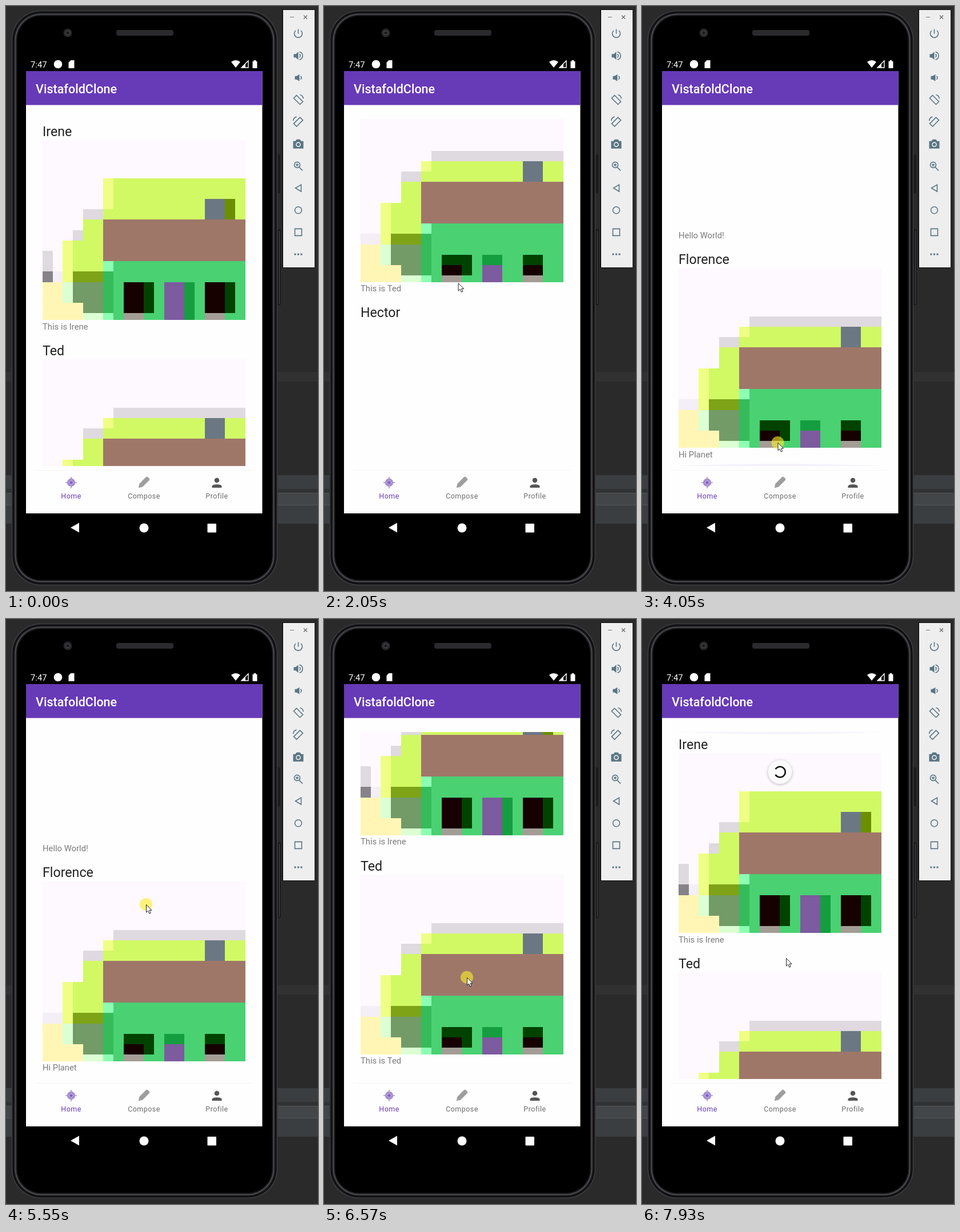
Recreate the animation shown at these times as an HTML page with a canvas. Size 546x1025 px, loop 8 s.

```html
<!DOCTYPE html>
<html lang="en">
<head>
<meta charset="utf-8">
<style>
  html, body { margin: 0; width: 100%; height: 100%; overflow: hidden; background: #2a2a2a; }
  canvas { display: block; }
</style>
</head>
<body>
<canvas id="stage" width="546" height="1025"></canvas>
<script>
const g = document.getElementById('stage').getContext('2d');
const LOOP = 8000, PITCH = 383.7, MAX_SCROLL = 927;

// ---------- drawing helpers ----------
function rect(color, x, y, w, h) {
  g.fillStyle = color;
  g.fillRect(x, y, w, h);
}
function round(color, x, y, w, h, r) {
  g.fillStyle = color;
  g.beginPath();
  g.roundRect(x, y, w, h, r);
  g.fill();
}
function disc(color, x, y, r) {
  g.fillStyle = color;
  g.beginPath();
  g.arc(x, y, r, 0, 7);
  g.fill();
}
function label(str, x, y, size, color, weight = 400) {
  g.font = `${weight} ${size}px Roboto, sans-serif`;
  g.fillStyle = color;
  g.fillText(str, x, y);
}
function shape(d, x, y, fill, stroke, width = 1.6, angle = 0) {
  const path = new Path2D(d);
  g.save();
  g.translate(x, y);
  g.rotate(angle);
  if (fill) { g.fillStyle = fill; g.fill(path); }
  if (stroke) { g.strokeStyle = stroke; g.lineWidth = width; g.stroke(path); }
  g.restore();
}
function clipped(x, y, w, h, draw) {
  g.save();
  g.beginPath();
  g.rect(x, y, w, h);
  g.clip();
  draw();
  g.restore();
}

// ---------- motion ----------
const progress = (t, a, b) => b > a ? Math.min(1, Math.max(0, (t - a) / (b - a))) : +(t >= a);
const smooth = u => u * u * (3 - 2 * u);
const easeOut = u => 1 - (1 - u) ** 3;
const mix = (a, b, u) => a + (b - a) * u;
const bump = (t, a, b) => Math.sin(Math.PI * progress(t, a, b));

// The pointer glides between swipes; a swipe drags the list, which then coasts to `rest`
const swipes = [
  { press: 70, release: 70, x: 468, from: 956, to: 956 },
  { press: 560, release: 560, x: 231, from: 447, to: 447 },
  { press: 930, release: 1600, x: 237, from: 680, to: 459, rest: 543.5, settle: 1330 },
  { press: 3090, release: 3450, x: 226, from: 578, to: 398, rest: MAX_SCROLL, settle: 440 },
  { press: 3970, release: 4560, x: 237.5, from: 770, to: 500 },
  { press: 5550, release: 5900, x: 245, from: 500, to: 760, rest: 364, settle: 500 },
  { press: 6410, release: 6580, x: 250, from: 435, to: 650, rest: 0, settle: 260 },
  { press: 7290, release: 7800, x: 237, from: 307, to: 594 },
  { press: 7930, release: 7930, x: 252, from: 594, to: 594 }
];
const dragged = (s, t) => progress(t, s.press, s.release) ** 2;

function scrollAt(t) {
  let scroll = 0;
  for (const s of swipes) {
    if (t < s.press) break;
    const drag = scroll + (s.from - s.to) * dragged(s, t);
    scroll = Math.min(MAX_SCROLL, Math.max(0, drag));
    if (s.settle) scroll = mix(scroll, s.rest, easeOut(progress(t, s.release, s.release + s.settle)));
  }
  return scroll;
}

function pointerAt(t) {
  const i = swipes.findLastIndex(s => t >= s.press);
  const s = swipes[i], next = swipes[i + 1] || s;
  if (t < s.release) return { x: s.x, y: mix(s.from, s.to, dragged(s, t)), down: true };
  const u = smooth(progress(t, s.release, next.press));
  return { x: mix(s.x, next.x, u), y: mix(s.to, next.from, u), down: false };
}

// ---------- feed ----------
const posts = [
  { name: 'Irene', caption: 'This is Irene', picture: 'tall' },
  { name: 'Ted', caption: 'This is Ted', picture: 'low' },
  { name: 'Hector', caption: 'Hello World!' },
  { name: 'Florence', caption: 'Hi Planet', picture: 'low' }
];

// A blocky house on a grid of 20 columns, cropped at the top and bottom
function house(top, tall) {
  const px = col => Math.round(64 + col * 17.73), py = row => Math.round(top - 6.3 + row * 18.2);
  const block = (color, x0, y0, x1, y1) =>
    rect(color, px(x0), py(y0), px(x1) - px(x0), py(y1) - py(y0));
  const lime = '#d1f964', pale = '#efff84', gray = '#dfd9e0', sand = '#fff6b5';
  const roof = tall ? 4 : 6;

  block('#fef8ff', 0, 0, 20, 18);
  block(gray, 4, 7, 6, 8);
  if (tall) {
    block(gray, 3, 9, 4, 10);
    block(gray, 0, 11, 1, 13);
  } else {
    block(gray, 7, 5, 20, 6);
  }
  for (let i = 0; i < 3; i++) block(lime, 6 - 2 * i, 6 + 2 * i, 7, 14);
  block(lime, 6, roof, 20, 8);
  block(pale, 6, roof, 7, 7);
  block(pale, 2, 10, 3, 14);

  block('#f4eef6', 0, 13, 2, 14);
  if (tall) block('#868388', 0, 13, 1, 14);
  block('#7ea317', 3, 13, 6, 14);
  block('#dcffd3', 2, 14, 6, 18);
  block('#739b67', 3, 14, 6, 17);
  block(sand, 0, 14, 2, 18);
  block(sand, 0, 16, 4, 18);

  block('#9f7769', 6, 8, 20, 12);
  block('#49d172', 7, 12, 20, 18);
  block('#8dffb3', 6, 12, 7, 18);
  block('#36bb5a', 6, 13, 7, 17);
  block('#6b7883', 16, 6, 18, 8);
  if (tall) block('#6b8f00', 18, 6, 19, 8);

  for (const x of [8, 12, 16]) {
    const door = x === 12, end = door ? 18 : 17;
    const shade = door ? '#149e3f' : '#004200';
    if (tall) block(shade, x + 2, 14, x + 3, end);
    else block(shade, x, 15, x === 8 ? 11 : x + 2, end);
    block(door ? '#7c5b9e' : '#160000', x, tall ? 14 : 16, x + 2, end);
    if (!door) block('#a49d96', x, 17, x + 2, 18);
  }
}

function glow(y, height) {
  g.fillStyle = `rgba(103, 58, 183, ${.04 + Math.abs(height) / 300})`;
  g.beginPath();
  g.moveTo(59, y);
  g.quadraticCurveTo(241, y + height, 424, y);
  g.fill();
}

function feed(t) {
  const scroll = scrollAt(t);
  clipped(52, 198, 380, 608, () => {
    posts.forEach(({ name, caption, picture }, i) => {
      const y = i * PITCH - scroll, top = Math.round(y + 235.4);
      label(name, 64, y + 228, 23.2, '#222');
      if (picture) clipped(64, top, 355, 315, () => house(top, picture === 'tall'));
      label(caption, 64, y + 566.5, 14.8, '#7b7b7b');
    });
    glow(806, -50 * bump(t, 4000, 5080));
    glow(198, 40 * bump(t, 6640, 6960) + 7 * progress(t, 7290, 7930));
  });
}

function spinner(t) {
  const pull = progress(t, 7290, 7800) ** 2;
  const y = 153 + 21 * bump(t, 6700, 7240) + 131 * pull - 16 * smooth(progress(t, 7800, 7930));
  if (y < 166) return;
  clipped(36, 189, 412, 620, () => {
    g.shadowColor = 'rgba(0,0,0,.28)';
    g.shadowBlur = 5;
    g.shadowOffsetY = 1;
    disc('#fafafa', 241.5, y, 21);
    g.shadowColor = 'transparent';
    const turn = (t - 7930) / 400;
    g.strokeStyle = `rgba(15,15,15,${.3 + .7 * pull})`;
    g.lineWidth = 2.6;
    g.beginPath();
    g.arc(241.5, y, 9.3, turn - 2.6 * pull, turn + 2.6 * pull);
    g.stroke();
  });
}

function pointer(t) {
  if (t < swipes[0].press) return;
  const { x, y, down } = pointerAt(t);
  if (down) disc('rgba(250,238,40,.62)', x, y, 11);
  shape('M.5 .5V14L3.6 11.2L5.8 16.2L8.2 15.1L6 10.3H10Z', x, y, '#fff', '#222', 1);
}

// ---------- fixed surroundings ----------
function desktop() {
  rect('#2a2a2a', 0, 0, 546, 1025);
  rect('#313131', 0, 641, 546, 17);
  rect('#3b3e40', 0, 822, 546, 85);
  rect('#303234', 0, 846, 546, 8);
  rect('#54575a', 0, 853, 546, 22);
  rect('#434649', 0, 854, 546, 20);
}

function phone() {
  round('#1b1b1c', 474, 260, 6, 68, 2);
  round('#1b1b1c', 474, 391, 7, 133, 2);
  rect('#48494c', 478, 394, 1, 128);

  const rim = ['#38393c', '#0c0c0d', '#1c1c1e', '#4a4b4f', '#1a1a1c', '#000'];
  rim.forEach((color, i) => {
    const inset = 2 * i;
    round(color, 9.5 + inset, 7.5 + inset, 466 - 2 * inset, 1008 - 2 * inset, 52 - inset);
  });
  disc('#29292c', 108, 47, 7.5);
  disc('#424246', 108, 47, 4);
  disc('#17171a', 108, 47, 2.5);
  round('#2b2b2d', 193, 42, 100, 10, 4);

  label('7:47', 43, 107.5, 14.8, '#fff');
  disc('#fff', 91, 102, 7.3);
  shape('M-5 -3L-1 -7H5V7H-5Z', 114.5, 102, '#fff');
  shape('M0 7L-8 -3Q0 -9 8 -3Z', 402, 101, '#fff');
  shape('M-6 6H6V-6Z', 418, 102, null, '#fff', 1.4);
  shape('M-6 6H1V-1Z', 418, 102, '#fff');
  shape('M-4 -5H-2V-7H2V-5H4V7H-4Z', 435.5, 102, '#fff');

  rect('#fefefe', 35, 114, 413.5, 775);
  rect('#673ab7', 35, 114, 413.5, 59.5);
  label('VistafoldClone', 52, 152.5, 21.5, '#fff', 500);

  shape('M-8 0L7 -8.5V8.5Z', 121, 914, '#fff');
  disc('#fff', 241.5, 914.5, 8);
  round('#fff', 352.5, 907, 15.5, 15.5, 1);
}

function tabs() {
  const lilac = '#a58dd0';
  rect('#f5f5f5', 52, 813, 380, 1);
  shape('M-10 0H10M0 -10V10', 114, 835, null, lilac);
  disc(lilac, 114, 835, 7.2);
  shape('M0 -5L1.5 -1.5L5 0L1.5 1.5L0 5L-1.5 1.5L-5 0L-1.5 -1.5Z', 114, 835, '#7d5cbd', '#d3c5ea', .7);
  shape('M-13 0L-7 -4H9Q12 -4 12 -1V1Q12 4 9 4H-7Z', 241, 835, '#9e9e9e', null, 1, -.79);
  disc('#555', 369, 831, 4.3);
  shape('M-8.5 8V5.5C-8.5 1 8.5 1 8.5 5.5V8Z', 369, 836, '#555');
  g.textAlign = 'center';
  g.letterSpacing = '.45px';
  ['Home', 'Compose', 'Profile'].forEach((tab, i) =>
    label(tab, 114 + 127.5 * i, 862.5, 12.5, i ? '#6b6b6b' : '#673ab7'));
  g.textAlign = 'left';
  g.letterSpacing = '0px';
}

const HORN = 'M-8 -3H-4.5L0 -7V7L-4.5 3H-8Z';
const tools = [
  { line: 'M0 -8V0M-4.5 -5.5A7 7 0 1 0 4.5 -5.5' },
  { solid: HORN, line: 'M2 -3Q5 0 2 3M2 -7C9.5 -5 9.5 5 2 7' },
  { solid: 'M-6 -3H-3L2 -6V6L-3 3H-6Z', line: 'M4 -3Q7 0 4 3' },
  { line: 'M-3 -8L8 3L3 8L-8 -3Z M3 -9Q8 -8 9 -2' },
  { line: 'M3 -8L-8 3L-3 8L8 -3Z M-3 -9Q-8 -8 -9 -2' },
  { solid: 'M-9 -5H-5L-3 -8H3L5 -5H9V8H-9Z' },
  { line: 'M3 -2A5 5 0 1 1 -7 -2A5 5 0 1 1 3 -2M1.5 2L7.5 8M-4.5 -2H.5M-2 -4.5V.5' },
  { line: 'M-5 0L5 -6V6Z' },
  { line: 'M6 0A6 6 0 1 1 -6 0A6 6 0 1 1 6 0' },
  { line: 'M-6 -6H6V6H-6Z' },
  { solid: 'M-7 -1.5h3v3h-3ZM-1.5 -1.5h3v3h-3ZM4 -1.5h3v3h-3Z' }
];

function toolbar() {
  const ink = '#5a7684', paper = '#eeeeef', x = 511.5, first = 48.5, gap = 38.65;
  rect('#111', 483.5, 6, 57, 453);
  rect(paper, 485, 7, 55, 451);
  shape('M-3.5 0H3.5', 500.5, 19.5, null, '#777', 1);
  shape('M-3 -3L3 3M3 -3L-3 3', 524, 19.5, null, '#666', 1.2);
  tools.forEach(({ solid, line }, i) => {
    const y = first + gap * i;
    if (solid) shape(solid, x, y, ink);
    if (line) shape(line, x, y, null, ink);
  });
  disc(paper, x, first + 5 * gap + 1, 4.4);
  disc(ink, x, first + 5 * gap + 1, 2.8);
}

const start = performance.now();
function frame() {
  const t = (performance.now() - start) % LOOP;
  desktop();
  phone();
  toolbar();
  feed(t);
  tabs();
  spinner(t);
  pointer(t);
  requestAnimationFrame(frame);
}
frame();
</script>
</body>
</html>
```
